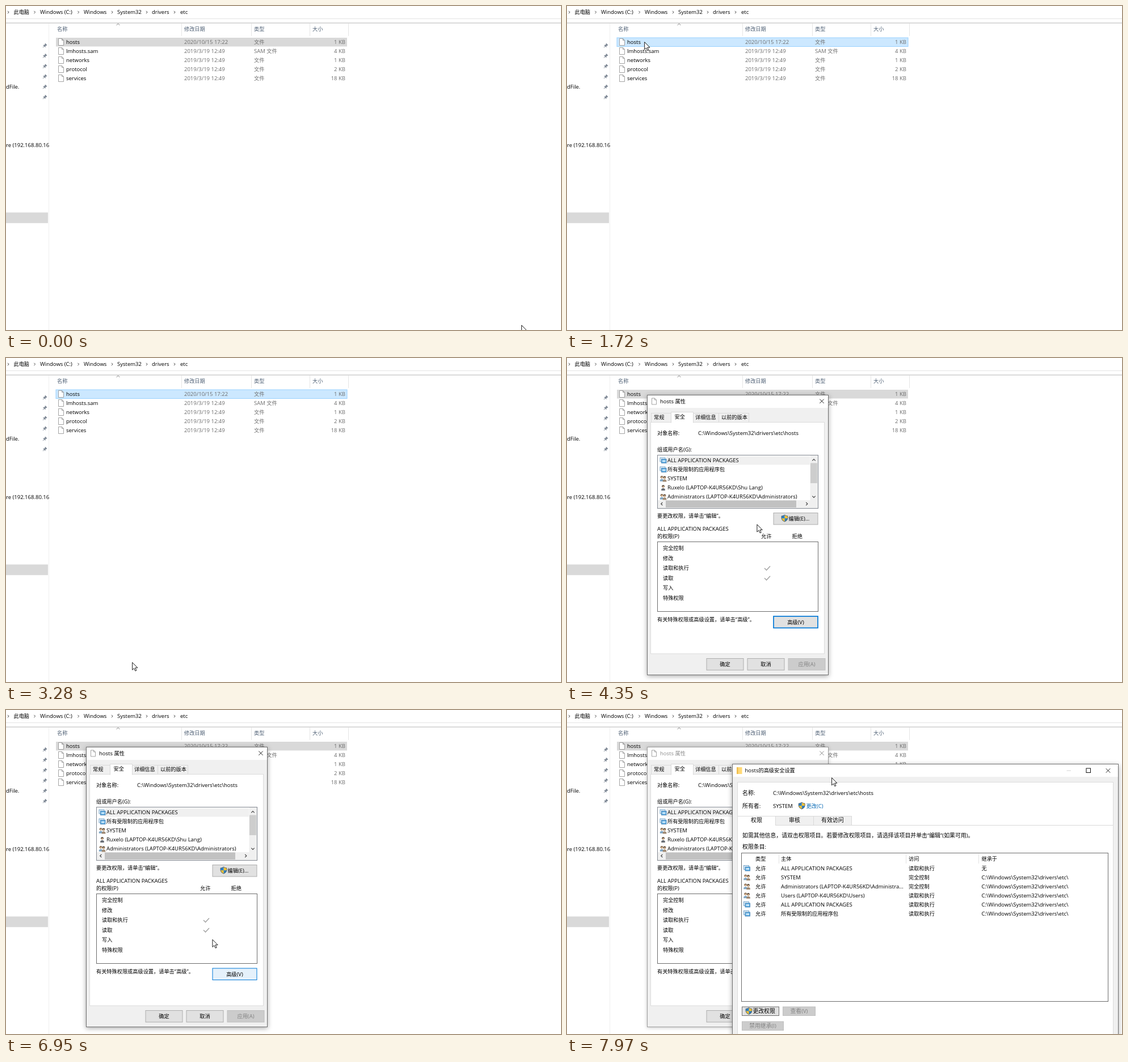
Animation of 978x572 px, one loop 8000 ms. Source, as an HTML page:

```html
<!DOCTYPE html>
<html lang="zh-CN">
<head>
<meta charset="utf-8">
<title>hosts</title>
<style>
html, body { margin: 0; width: 100%; height: 100%; overflow: hidden; background: #fff; }
svg { display: block; width: 978px; height: 572px; }
text { font: 9.5px "Open Sans", "Noto Sans", sans-serif; white-space: pre; }
.cjk { font-family: "Noto Sans CJK SC", "Noto Sans CJK", sans-serif; }
#menu { filter: drop-shadow(2.5px 2.5px 1px rgba(0,0,0,.5)); }
#props, #adv { filter: drop-shadow(0 2px 4px rgba(0,0,0,.34)); }
#props.back { filter: drop-shadow(0 1px 3px rgba(0,0,0,.22)); }
</style>
</head>
<body>
<svg id="stage" viewBox="0 0 978 572" xmlns="http://www.w3.org/2000/svg">
  <g id="explorer"></g>
  <g id="menu"></g>
  <g id="props"></g>
  <g id="adv"></g>
  <path id="cursor" d="M.6 .6V13.8L3.6 11L5.8 15.6L7.9 14.7L5.7 10.1H9.9Z" fill="#fff" stroke="#000" stroke-width=".9"/>
</svg>
<script>
const LOOP = 8000;
const $ = id => document.getElementById(id);
const DIR = 'C:\\Windows\\System32\\drivers\\etc\\';
const HOST = 'LAPTOP-K4UR56KD\\';

// ---- drawing helpers: cy is the visual centre of a line of text ----
function text(x, cy, str, o = {}) {
  const size = o.size || 9.2;
  const runs = str.replace(/[\u3000-\u9fff\uff00-\uffef]+/g,
    s => `<tspan class="cjk" style="font-size:${size}px">${s}</tspan>`);
  return `<text x="${x}" y="${cy + 3.4}" fill="${o.fill || '#000'}" text-anchor="${o.anchor || 'start'}"` +
    `${o.cls ? ` class="${o.cls}"` : ''}${o.bold ? ' style="font-weight:700"' : ''}>${runs}</text>`;
}
const rect = (x, y, w, h, fill, stroke = 'none', extra = '') =>
  `<rect x="${x}" y="${y}" width="${w}" height="${h}" fill="${fill}" stroke="${stroke}" ${extra}/>`;
const path = (d, stroke, width = 1, fill = 'none', extra = '') =>
  `<path d="${d}" fill="${fill}" stroke="${stroke}" stroke-width="${width}" ${extra}/>`;
const dot = (x, y, r, fill) => `<circle cx="${x}" cy="${y}" r="${r}" fill="${fill}"/>`;
const hline = (x1, x2, y, color) => path(`M${x1} ${y}H${x2}`, color);
const vline = (x, y1, y2, color) => path(`M${x} ${y1}V${y2}`, color);

// chevron pointing along (dx, dy)
function chevron(x, y, r, dx, dy, color, width = 1) {
  const h = r / 2;
  const a = [x - dx * h + dy * r, y - dy * h + dx * r];
  const b = [x + dx * h, y + dy * h];
  const c = [x - dx * h - dy * r, y - dy * h - dx * r];
  return path(`M${a}L${b}L${c}`, color, width);
}
const cross = (x, y, r, extra) =>
  path(`M${x - r} ${y - r}L${x + r} ${y + r}M${x + r} ${y - r}L${x - r} ${y + r}`, '#222', 1, 'none', extra);
const sheet = (x, y, w = 9, h = 12) =>
  path(`M${x} ${y}h${w - 3}l3 3v${h - 3}h${-w}zM${x + w - 3} ${y}v3h3`, '#8c8c8c', .8, '#fff');

function shield(x, y) {
  return `<g transform="translate(${x} ${y})">` +
    '<path d="M0-6Q3-4 5.5-4V0Q5 4 0 6Z" fill="#f3c034"/><path d="M0-6Q-3-4-5.5-4V0Q-5 4 0 6Z" fill="#2d7fc1"/>' +
    '<path d="M0 0H5.5Q5 4 0 6Z" fill="#2d7fc1"/><path d="M0 0H-5.5Q-5 4 0 6Z" fill="#f3c034"/>' +
    '<path d="M0-6Q3-4 5.5-4V0Q5 4 0 6Q-5 4-5.5 0V-4Q-3-4 0-6Z" fill="none" stroke="#4a5a68" stroke-width=".8"/></g>';
}
const appIcon = (x, y) =>
  rect(x - 5.5, y - 5, 9, 7, '#e4f1fa', '#5b93bf', 'stroke-width=".8"') +
  rect(x - 3, y - 2.5, 8.5, 7, '#5aa9df', '#3f7cb0', 'stroke-width=".8"') +
  rect(x - 1.5, y - .5, 5.5, 3, '#c9e6f8');
const person = (x, y, body, hair = '#80654a') =>
  path(`M${x - 3.3} ${y + 5}V${y + 2.5}Q${x} ${y - 1} ${x + 3.3} ${y + 2.5}V${y + 5}Z`, 'none', 0, body) +
  dot(x, y - 2.4, 2.4, hair) + dot(x + .2, y - 1.6, 1.5, '#e2bd98');
const groupIcon = (x, y) => person(x - 2.4, y - .3, '#7fa6c4') + person(x + 2.5, y + .4, '#a08a74', '#5b4a3a');

function button(x, y, w, h, label, o = {}) {
  const fill = o.off ? '#ccc' : '#e1e1e1', edge = o.off ? '#bfbfbf' : o.edge || '#adadad';
  return rect(x + .5, y + .5, w - 1, h - 1, fill, edge, o.id ? `id="${o.id}"` : '') +
    text(o.tx || x + w / 2, y + h / 2, label,
      { fill: o.off ? '#838383' : '#000', anchor: o.tx ? 'start' : 'middle', size: o.size });
}

// ---- explorer ----
function explorer() {
  let s = hline(0, 978, 22.5, '#e4e4e4') + hline(0, 978, 30, '#b5b5b5') + vline(75.5, 31, 572, '#efefef');
  [['此电脑', 13.5], ['Windows (C:)', 60], ['Windows', 137], ['System32', 196], ['drivers', 257], ['etc', 307]]
    .forEach(([name, x]) => s += text(x, 10.5, name));
  [4, 50.5, 127.5, 187, 248, 297].forEach(x => s += chevron(x, 11, 2.2, 1, 0, '#444'));

  const pin = '#7d8794';
  for (let i = 0; i < 6; i++)
    s += `<g transform="translate(68 ${70.3 + i * 18.2}) rotate(45) scale(.9)">` +
      rect(-2.5, -4.5, 5, 1.5, pin) + rect(-1.7, -3.5, 3.4, 4, pin) + rect(-3, 0, 6, 1.3, pin) +
      rect(-.4, 1, .8, 3.8, pin) + '</g>';
  s += text(0, 142.5, 'dFile.') + text(0, 246, 're (192.168.80.16') + rect(0, 364.5, 74, 18.8, '#d9d9d9');

  s += chevron(197.5, 32.5, 2.8, 0, -1, '#777');
  [['名称', 90], ['修改日期', 314], ['类型', 437], ['大小', 540]]
    .forEach(([name, x]) => s += text(x, 40.5, name, { fill: '#4f6075' }));
  [309.5, 432.5, 535.5, 603.5].forEach(x => s += vline(x, 31, 53, '#e5e5e5'));

  s += rect(88, 56, 513, 15.5, '#d9d9d9', 'none', 'id="row"');
  [['hosts', 1], ['lmhosts.sam', 4], ['networks', 1], ['protocol', 2], ['services', 18]].forEach(([name, kb], i) => {
    const y = 63.5 + i * 16, gray = { fill: '#6d6d6d' };
    s += sheet(92.5, y - 6) + text(106, y, name) +
      text(314, y, i ? '2019/3/19 12:49' : '2020/10/15 17:22', gray) +
      text(437, y, i == 1 ? 'SAM 文件' : '文件', gray) +
      text(598, y, kb + ' KB', { fill: '#6d6d6d', anchor: 'end' });
  });
  return s;
}

// ---- context menu: label, icon kind, icon colour, text colour; null is a divider ----
const ITEMS = [
  ['打开方式(H)'], ['使用 Zurno 共享', 'dot', '#1592dc'], ['Edit with Quellorn VEDA', 'box', '#16182b'],
  ['Edit with Zofabel', 'box', '#10302a'], ['Open with Orvanel Text'], ['7-Zip', 'sub'], ['CRC SHA', 'sub'],
  ['Edit with Jotling++', 'box', '#a5bd83'], ['Select Left File for Compare', 'dot', '#b92c2c'],
  ['使用 Velmora Shielder扫描...', 'box', '#0078d7'], ['霁讯桥发送文件', 'dot', '#5b9cc9'],
  ['通过杉禾邮箱管家发送', 'box', '#c4222b'], ['共享', 'share'], ['通过杉禾飞羽邮发送', 'dot', '#c5302c'], null,
  ['TortoiseSVN', 'sub', '#6d8291'], null,
  ['上传到栎舟网盘', 'dot', '#6bb8e6'], ['自动备份该文件夹', 'dot', '#6bb8e6', '#808080'], null,
  ['还原以前的版本(V)'], null, ['发送到(N)', 'sub'], null, ['剪切(T)'], ['复制(C)'], null,
  ['创建快捷方式(S)'], ['删除(D)', 'uac'], ['重命名(M)', 'uac'], null, ['属性(R)']
];
const itemYs = [];

function menu() {
  let s = rect(124.5, 67.5, 216, 481, '#eee', '#a5a5a5') + rect(126, 0, 213, 17.5, '#fff', 'none', 'id="hover"');
  let y = 79.5;
  ITEMS.forEach((item, i) => {
    if (!item) {
      s += hline(132, 332, Math.floor(y - 6) + .5, '#959595');
      y += 5.3;
      return;
    }
    const [label, kind, color, fill] = item;
    itemYs.push(y);
    s += text(151, y, label, { fill, bold: i == 0 });
    if (kind == 'dot') s += dot(138.7, y, 5, color);
    if (kind == 'box') s += rect(133, y - 5.7, 11.5, 11.5, color);
    if (kind == 'uac') s += shield(138.7, y - .5);
    if (kind == 'sub') {
      s += chevron(329, y - .3, 4.2, 1, 0, '#222');
      if (color) s += dot(139, y, 5, color);
    }
    if (kind == 'share')
      s += path(`M136 ${y - 2}h-2.5v7h9v-3M135.5 ${y + 2}q1-4.5 5-4.5v-2.5l4 4l-4 4v-2.5q-3 0-5 1.5`, '#333', .9);
    y += 17.5;
  });
  return s;
}

// ---- properties dialog ----
function props() {
  let s = rect(141.5, 65.5, 319, 494, '#f0f0f0', '#6f6f6f', 'class="edge"') + rect(142, 66, 318, 22, '#fff') +
    sheet(149.5, 71, 8, 11) + text(164, 76.5, 'hosts 属性', { cls: 'active' }) + cross(449, 76.3, 3.7, 'class="activeX"');

  s += rect(148.5, 97.5, 172, 17, '#f0f0f0', '#d9d9d9') + vline(267.5, 98, 113, '#d9d9d9') +
    rect(147.5, 113.5, 306, 408.5, '#fff', '#dcdcdc') +
    path('M183.5 114.5V95.5H222.5V114.5', '#d9d9d9', 1, '#fff');
  [['常规', 153, 105], ['安全', 189.5, 104], ['详细信息', 226, 105], ['以前的版本', 272, 105]]
    .forEach(([label, x, y]) => s += text(x, y, label));

  s += text(159, 133, '对象名称:') + text(231, 133, DIR + 'hosts') + text(159, 161.5, '组或用户名(G):');
  s += rect(159.5, 171.5, 283, 94, '#fff', '#828790') + rect(175, 173, 253, 15.5, '#f0f0f0');
  ['ALL APPLICATION PACKAGES', '所有受限制的应用程序包', 'SYSTEM',
    `Ruxelo (${HOST}Shu Lang)`, `Administrators (${HOST}Administrators)`].forEach((name, i) => {
    const y = 181 + i * 16;
    s += (i < 2 ? appIcon(169.5, y) : i == 3 ? person(169.5, y, '#6a6f76', '#5b4a3a') : groupIcon(169.5, y)) +
      text(177, y, name);
  });
  s += rect(428.5, 172, 13.5, 93, '#f0f0f0') + rect(160, 251, 282, 14, '#f0f0f0') +
    rect(429, 185.5, 12, 35.5, '#cdcdcd') + rect(174, 251.5, 230, 12.5, '#c1c1c1') +
    chevron(435, 180, 2.7, 0, -1, '#444', 1.2) + chevron(435, 245, 2.7, 0, 1, '#444', 1.2) +
    chevron(167, 257.5, 2.7, -1, 0, '#444', 1.2) + chevron(422.5, 257.5, 2.7, 1, 0, '#444', 1.2);

  s += text(159, 279, '要更改权限，请单击“编辑”。') +
    button(363.5, 273, 79, 21.5, '编辑(E)...', { tx: 390.5 }) + shield(383.5, 283) +
    text(159, 301.5, 'ALL APPLICATION PACKAGES') + text(159, 314.5, '的权限(P)') +
    text(342, 314.5, '允许') + text(396.5, 314.5, '拒绝') + rect(159.5, 324.5, 283, 123, '#fff', '#6c6c6c');
  ['完全控制', '修改', '读取和执行', '读取', '写入', '特殊权限'].forEach((name, i) => {
    const y = 336 + i * 17.5;
    s += text(169, y, name);
    if (i == 2 || i == 3) s += path(`M348 ${y}l3.5 3.5l6.5-7`, '#a8a8a8', 1.6);
  });
  s += text(159, 461.5, '有关特殊权限或高级设置，请单击“高级”。') +
    button(363.5, 455.5, 79, 21.5, '高级(V)', { id: 'advBtn' }) +
    button(245.5, 530, 66, 21.5, '确定') + button(317.5, 530, 66, 21.5, '取消') +
    button(389.5, 530, 66, 21.5, '应用(A)', { off: true });
  return s;
}

// ---- advanced security window ----
function advanced() {
  const big = { size: 9.9 };
  let s = rect(291.5, 95.5, 680, 540, '#f0f0f0', '#707070') + rect(292, 96, 679, 22, '#fff') +
    rect(299, 101, 9.5, 12, '#ffd977') + rect(299, 101, 2.5, 12, '#efbd4e') +
    text(313.5, 107, 'hosts的高级安全设置') + hline(880.5, 888, 107, '#d4d4d4') +
    rect(915, 103, 7.5, 7.5, 'none', '#111') + cross(953.5, 107, 3.7);

  s += rect(300.5, 127.5, 662, 500, '#fff', '#dcdcdc') +
    text(309, 146.5, '名称:', big) + text(363, 146.5, DIR + 'hosts') +
    text(309, 169.5, '所有者:', big) + text(363, 169.5, 'SYSTEM') +
    shield(413.7, 169) + text(421.5, 169.5, '更改(C)', { fill: '#0066b4' });
  s += rect(367.5, 187.5, 67, 16, '#f0f0f0', '#d9d9d9') + rect(434.5, 187.5, 67, 16, '#f0f0f0', '#d9d9d9') +
    path('M301 187.5H367.5V203.5H962', '#d9d9d9');
  [['权限', 324], ['审核', 391], ['有效访问', 448]].forEach(([label, x]) => s += text(x, 195, label, big));
  s += text(309, 222, '如需其他信息，请双击权限项目。若要修改权限项目，请选择该项目并单击“编辑”(如果可用)。', big) +
    text(309, 241.5, '权限条目:', big);

  s += rect(307.5, 252.5, 646, 262, '#fff', '#6c6c6c');
  [373.5, 597.5, 725.5].forEach(x => s += vline(x, 254, 271, '#e2e2e2'));
  [['类型', 332], ['主体', 377], ['访问', 602], ['继承于', 730.5]].forEach(([label, x]) => s += text(x, 262.5, label));
  const all = 'ALL APPLICATION PACKAGES';
  [all, 'SYSTEM', `Administrators (${HOST}Administra...`, `Users (${HOST}Users)`, all, '所有受限制的应用程序包']
    .forEach((name, i) => {
      const y = 279.5 + i * 16, group = i > 0 && i < 4;
      s += (group ? groupIcon : appIcon)(317, y) + text(332, y, '允许') + text(377, y, name) +
        text(602, y, i == 1 || i == 2 ? '完全控制' : '读取和执行') + text(730.5, y, i ? DIR : '无');
    });
  return s + button(308, 523.5, 66, 16.5, '更改权限', { tx: 327.5, size: 9.8, edge: '#707070' }) + shield(320.5, 531.5) +
    button(380, 523.5, 58, 16.5, '查看(V)', { off: true, size: 9.8 }) +
    button(308, 549.5, 74, 16.5, '禁用继承(I)', { off: true, size: 9.8 });
}

// ---- pointer path: time, x, y; a repeated point is a rest ----
const KEYS = [
  [0, 908, 563], [70, 908, 563], [640, 165, 60], [770, 130, 46], [870, 128, 58], [960, 128, 58],
  [1100, 124, 67], [1600, 124, 67], [1720, 136, 63], [1830, 140, 80], [2350, 200, 497], [2470, 200, 497],
  [2590, 215, 541], [2680, 219, 551], [2790, 219, 551], [2970, 222, 541], [3240, 222, 541],
  [3960, 223, 98], [4020, 223, 98], [4350, 334, 293], [4710, 417, 300], [4970, 417, 300],
  [5270, 387, 504], [5380, 387, 504], [5700, 395, 466], [5890, 336, 343], [6010, 260, 209],
  [6190, 392, 427], [6240, 392, 427], [6530, 396, 468], [6680, 396, 468],
  [7360, 272, 227], [7500, 261, 203], [7540, 261, 203], [7950, 466, 119], [LOOP, 466, 119]
];
const same = (a, b) => a[1] == b[1] && a[2] == b[2];

function slope(i, c) {
  const p = KEYS[i - 1], k = KEYS[i], n = KEYS[i + 1];
  if (!p || !n || same(p, k) || same(k, n)) return 0;
  return (n[c] - p[c]) / (n[0] - p[0]);
}
function pointer(t) {
  let i = 1;
  while (i < KEYS.length - 1 && KEYS[i][0] < t) i++;
  const a = KEYS[i - 1], b = KEYS[i], d = b[0] - a[0], u = (t - a[0]) / d;
  return [1, 2].map(c =>
    a[c] + (b[c] - a[c]) * u * u * (3 - 2 * u) +
    d * (slope(i - 1, c) * u * (1 - u) ** 2 - slope(i, c) * u * u * (1 - u)));
}

// ---- timing ----
const MENU_ON = 1800, MENU_OFF = 3200, PROPS_ON = 3330, ADV_ON = 7200;
const within = (t, a, b) => t >= a && t < b;
const show = (el, on) => el.setAttribute('display', on ? 'inline' : 'none');
const set = (el, attrs) => { for (const k in attrs) el.setAttribute(k, attrs[k]); };

function reveal(el, t, start, span, cx, cy) {
  const p = Math.min(1, Math.max(0, (t - start) / span));
  const k = 1 - (1 - p) ** 3, z = .93 + .07 * k;
  show(el, t >= start);
  set(el, { opacity: k, transform: `translate(${cx} ${cy}) scale(${z}) translate(${-cx} ${-cy})` });
}

$('explorer').innerHTML = explorer();
$('menu').innerHTML = menu();
$('props').innerHTML = props();
$('adv').innerHTML = advanced();
const [titleText, titleX, edge] = ['.active', '.activeX', '.edge'].map(q => document.querySelector(q));

function draw(t) {
  const [x, y] = pointer(t);
  $('cursor').setAttribute('transform', `translate(${x.toFixed(2)} ${y.toFixed(2)})`);

  const hot = within(t, 830, PROPS_ON);
  set($('row'), { fill: hot ? '#cce8ff' : '#d9d9d9', stroke: hot ? '#99d1ff' : 'none' });

  show($('menu'), within(t, MENU_ON, MENU_OFF));
  const over = itemYs.find(c => Math.abs(c - y) < 8.75);
  show($('hover'), over !== undefined && x > 126 && x < 339);
  if (over !== undefined) $('hover').setAttribute('y', over - 8.75);

  reveal($('props'), t, PROPS_ON, 220, 301, 312);
  const back = t >= ADV_ON - 40;
  $('props').classList.toggle('back', back);
  edge.setAttribute('stroke', back ? '#9c9c9c' : '#6f6f6f');
  titleText.setAttribute('fill', back ? '#8c8c8c' : '#000');
  titleX.setAttribute('stroke', back ? '#8c8c8c' : '#222');
  const lit = within(t, 5500, 5960) || within(t, 6330, ADV_ON - 40);
  set($('advBtn'), {
    fill: lit ? '#e5f1fb' : '#e1e1e1',
    stroke: back ? '#adadad' : '#0078d7',
    'stroke-width': lit || back ? 1 : 1.7
  });

  reveal($('adv'), t, ADV_ON, 300, 631, 360);
}

function frame(now) {
  draw(now % LOOP);
  requestAnimationFrame(frame);
}
draw(0);
requestAnimationFrame(frame);
</script>
</body>
</html>
```
